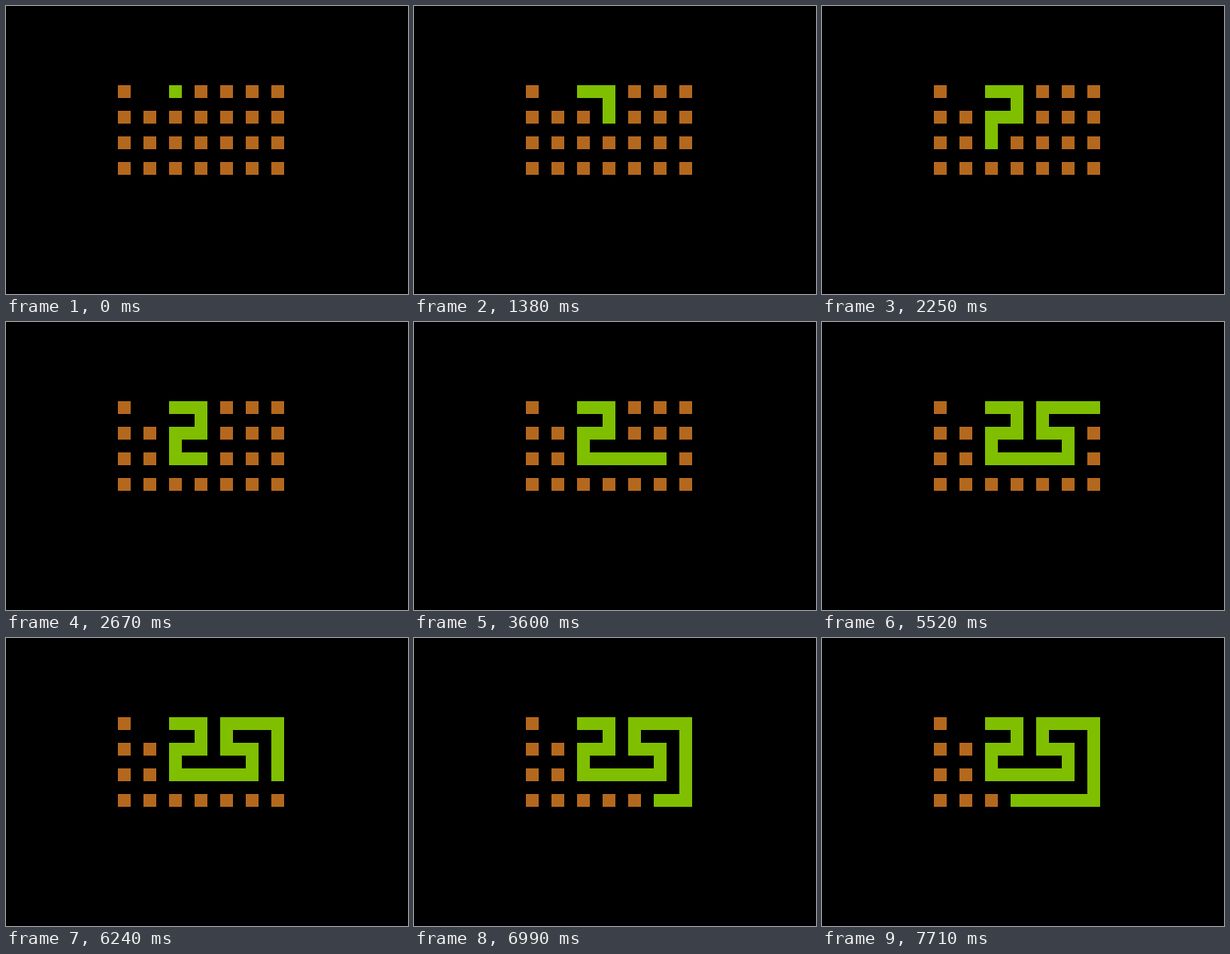
An HTML page that plays this animation: 503x360 px, repeating every 8000 ms.

```html
<!DOCTYPE html>
<html lang="en">
<head>
<meta charset="utf-8">
<title>Snake path</title>
<style>
  html, body { margin: 0; width: 100%; height: 100%; overflow: hidden; background: #000; }
  svg { display: block; }
  .dot { fill: #b4681e; }
  .head { fill: #7fbf00; }
  .snake {
    fill: none;
    stroke: #7fbf00;
    stroke-width: 16px;
    stroke-linecap: square;
    stroke-linejoin: miter;
    stroke-dasharray: 0px 2000px;
    animation: grow 8s step-end infinite;
  }
  /* Each stop adds one 32px grid step */
  @keyframes grow {
    0%      { stroke-dasharray: 0px 2000px; }
    9.75%   { stroke-dasharray: 32px 2000px; }
    17.25%  { stroke-dasharray: 64px 2000px; }
    22.875% { stroke-dasharray: 96px 2000px; }
    28.125% { stroke-dasharray: 128px 2000px; }
    33%     { stroke-dasharray: 160px 2000px; }
    39.75%  { stroke-dasharray: 192px 2000px; }
    45%     { stroke-dasharray: 224px 2000px; }
    49.5%   { stroke-dasharray: 256px 2000px; }
    54%     { stroke-dasharray: 288px 2000px; }
    58.875% { stroke-dasharray: 320px 2000px; }
    63.75%  { stroke-dasharray: 352px 2000px; }
    68.25%  { stroke-dasharray: 384px 2000px; }
    73.125% { stroke-dasharray: 416px 2000px; }
    78%     { stroke-dasharray: 448px 2000px; }
    82.875% { stroke-dasharray: 480px 2000px; }
    87.375% { stroke-dasharray: 512px 2000px; }
    92.25%  { stroke-dasharray: 544px 2000px; }
    96.375% { stroke-dasharray: 576px 2000px; }
    100%    { stroke-dasharray: 576px 2000px; }
  }
</style>
</head>
<body>
<svg width="503" height="360" viewBox="0 0 503 360" shape-rendering="crispEdges">
  <defs>
    <pattern id="dots" x="140" y="99" width="32" height="32" patternUnits="userSpaceOnUse">
      <rect class="dot" width="16" height="16"/>
    </pattern>
  </defs>
  <rect x="140" y="99" width="208" height="112" fill="url(#dots)"/>
  <rect x="172" y="99" width="16" height="16"/>
  <rect class="head" x="204" y="99" width="16" height="16"/>
  <path class="snake" d="M212 107h32v32h-32v32h96v-32h-32v-32h64v96h-96"/>
</svg>
</body>
</html>
```
